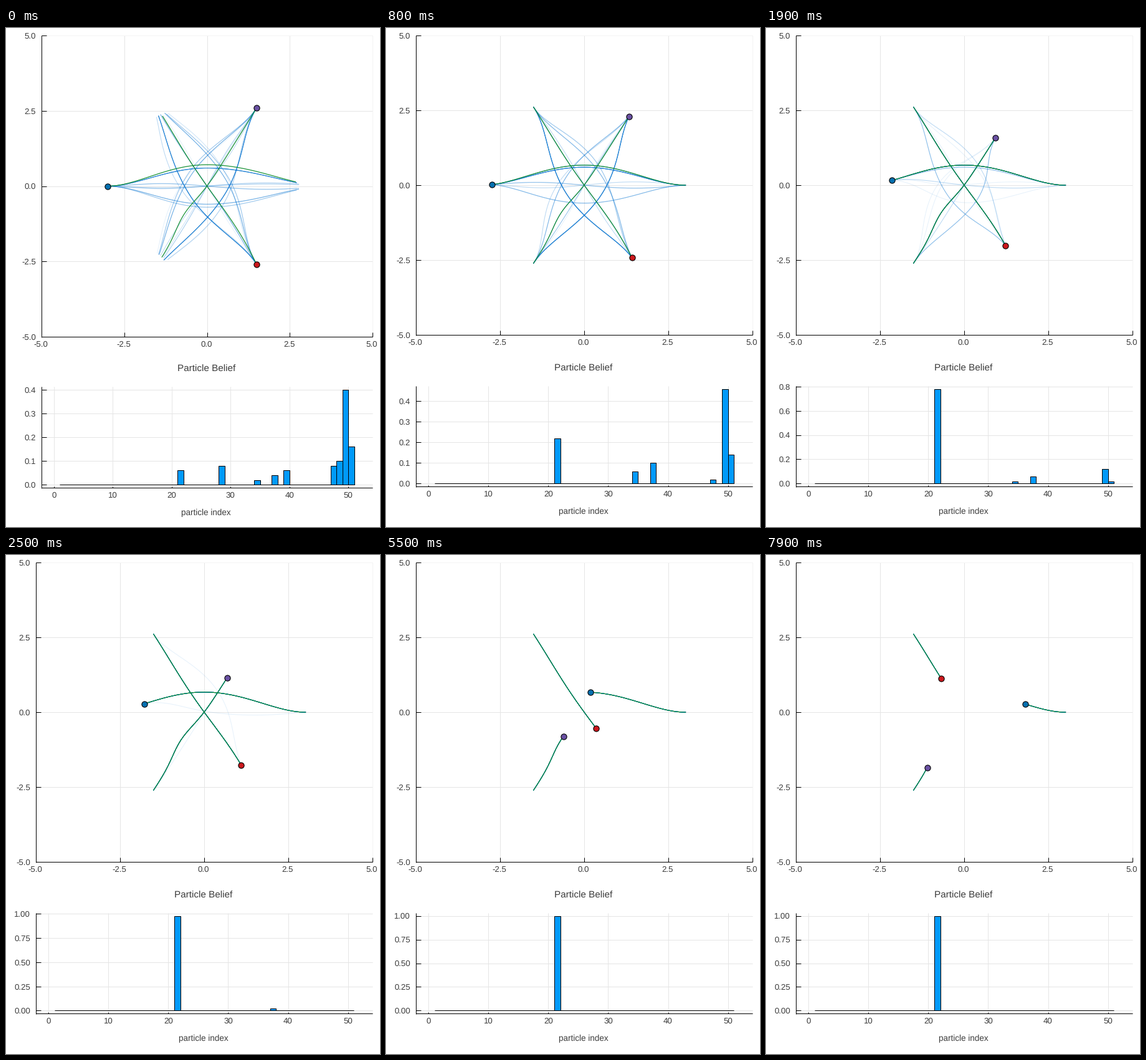
Recreate the animation shown at these times as a matplotlib script. Size 600x800 px, loop 8000 ms.

```python
import numpy as np
import matplotlib.pyplot as plt
from matplotlib.animation import FuncAnimation
from matplotlib.collections import LineCollection
from matplotlib.patches import Rectangle

W, H, DPI = 600, 800, 100
PX = 72 / DPI
FRAMES, STEP = 80, 100

INK, GRID, EDGE_GRID = "#3c3c3c", "#e5e5e5", "#f3f3f3"
BELIEF, TRUTH, BAR = "#0878d8", "#109022", "#009afa"
AGENT_COLORS = ["#0570b0", "#cb181d", "#6a51a3"]
HEADINGS = np.radians([0, 120, 240])

plt.rcParams["font.family"] = "Liberation Sans"
plt.rcParams["text.hinting"] = "none"
fig = plt.figure(figsize=(W / DPI, H / DPI), dpi=DPI, facecolor="white")
ax = fig.add_axes([0, 0, 1, 1])

# Key positions of each agent along its own axis, from -3 to 3
KEY_TIMES = np.array([0, 0.8, 2.5, 5.5, 7.9])
KEY_STEPS = np.array([
    [-3, -2.74, -1.787, 0.185, 1.806],
    [-3, -2.81, -2.085, -0.645, 1.304],
    [-3, -2.65, -1.335, 1.01, 2.148],
])

# Particle: copies at the start, growth, lifetime, turn per agent, turn size
TOTAL, TRUE_ID = 50, 21
PARTICLES = {
    28: (4, 0, 0.8, (0, 0, 1), 0.73),
    34: (1, 6.6, 2.6, (0, 0, -1), 0.7),
    37: (2, 4.4, 3.1, (0, -1, 0), 0.7),
    39: (3, 0, 0.8, (0, 1, 0), 0.73),
    47: (4, 0, 1.6, (0, 0, 0), 0),
    48: (5, 0, 0.8, (-1, -1, -1), 0.7),
    49: (20, 1.75, 2.6, (1, 1, 1), 0.6),
    50: (8, 1.12, 2.5, (-1, -1, -1), 0.6),
}


class Layout:
    """Pixel positions of both plots."""

    def __init__(self, left, bottom, belief_top, belief_bottom):
        self.left, self.right, self.top, self.bottom = left, 588, 12, bottom
        self.b_top, self.b_bottom = belief_top, belief_bottom
        self.b_full = (belief_bottom - belief_top) / 1.06
        self.b_zero = belief_bottom - 0.03 * self.b_full
        self.unit = (self.right - left) / 56.2
        self.mid = (left + self.right) / 2 - 1.3

    def x(self, v):
        return self.left + (v + 5) / 10 * (self.right - self.left)

    def y(self, v):
        return self.bottom - (v + 5) / 10 * (self.bottom - self.top)

    def index_x(self, v):
        return self.left + (v + 2.1) * self.unit


FIRST = Layout(57, 495, 575, 737)
REST = Layout(48, 492, 574, 735)


def progress(agent, t):
    """Cubic Hermite motion through the key positions."""
    ys = KEY_STEPS[agent]
    m = np.gradient(ys, KEY_TIMES, edge_order=2)
    i = min(np.searchsorted(KEY_TIMES, t, side="right"), len(ys) - 1) - 1
    h = KEY_TIMES[i + 1] - KEY_TIMES[i]
    u = (t - KEY_TIMES[i]) / h
    return ((1 + 2 * u) * (1 - u) ** 2 * ys[i] + u * (1 - u) ** 2 * h * m[i]
            + u * u * (3 - 2 * u) * ys[i + 1] + u * u * (u - 1) * h * m[i + 1])


def counts_at(t):
    counts = {pid: int(n * (1 + gain * t) * max(0, 1 - t / life) ** 2 + 0.5)
              for pid, (n, gain, life, *_) in PARTICLES.items()}
    counts[TRUE_ID] = TOTAL - sum(counts.values())
    return counts


def bell(s, far, skew=0):
    u = np.clip(np.where(s > 0, s / far, s / 3), -1, 1)
    u = u - skew * (1 - u * u)
    return np.clip(1 - u * u, 0, None) ** 2


def true_offset(agent, s, k):
    if agent == 0:
        return (0.67 + 0.04 * k) * bell(s, 3 + 0.6 * k)
    if agent == 1:
        return (0.05 - 0.016 * s) * np.sin(np.pi * s / 3)
    return 0.02 * np.cos(np.pi * s / 6) - 0.15 * np.exp(-((s - 1.15) / 0.85) ** 2)


def offset(pid, agent, s, k):
    if pid == TRUE_ID:
        return true_offset(agent, s, k)
    turns, size = PARTICLES[pid][3:]
    far = 3 + 0.6 * k
    if turns[agent]:
        skew = 0.12 if 0 in turns else 0
        return turns[agent] * size * bell(s, far, skew)
    return 0.11 * np.sin(1.2 * pid - 1.5 + 2 * agent) * np.sin(np.pi * s / far)


def to_stage(lay, agent, s, n):
    c, d = np.cos(HEADINGS[agent]), np.sin(HEADINGS[agent])
    return np.column_stack([lay.x(s * c - n * d), lay.y(s * d + n * c)])


def line(xs, ys, color="black", z=1):
    ax.plot(xs, ys, color=color, lw=PX, zorder=z, solid_capstyle="butt")


def text(x, y, s, size=13.3, ha="center"):
    ax.text(x, y, s, fontsize=size * PX, color=INK, ha=ha, va="baseline")


def x_tick(x, bottom, length, label, label_x, drop):
    line([x, x], [bottom - length, bottom], z=2)
    text(label_x, bottom + drop, label)


def y_tick(lay, y, label):
    line([lay.left, lay.left + 8], [y, y], z=2)
    text(lay.left - 9, y + 4.8, label, ha="right")


def spines(lay, top, bottom):
    line([lay.left] * 2, [top, bottom + 1], z=6)
    line([lay.left, lay.right], [bottom] * 2, z=6)


def draw_plane(lay):
    for v in np.arange(-5, 5.1, 2.5):
        x, y, label = lay.x(v), lay.y(v), f"{v:.1f}"
        shade = EDGE_GRID if v == 5 else GRID
        line([x, x], [lay.top, lay.bottom], shade)
        line([lay.left, lay.right], [y, y], shade)
        x_tick(x, lay.bottom, 7, label, x - 1, 16.3)
        y_tick(lay, y, label)
    spines(lay, lay.top, lay.bottom)


def draw_paths(lay, t, counts):
    k = max(0, 1 - t / 0.8)
    copies, truth = [], []
    for agent, color in enumerate(AGENT_COLORS):
        s0 = progress(agent, t)
        n0 = true_offset(agent, s0, k)
        for pid, count in counts.items():
            spread = 0.05 * k * np.sin(pid * 2.3 + agent)
            s = np.linspace(s0, min(3.02, 2.73 + spread + 0.4 * t), 60)
            n = offset(pid, agent, s, k)
            # Every path leaves from the agent, then joins its own lane
            ds = s - s0
            n = n + (n0 - n[0]) * (1 + 0.9 * ds) * np.exp(-(ds / 1.1) ** 2)
            pts = to_stage(lay, agent, s, n)
            copies += [pts] * count
            if pid == TRUE_ID:
                truth.append(pts)
        x, y = to_stage(lay, agent, s0, n0)[0]
        ax.plot(x, y, "o", ms=9.2 * PX, mfc=color, mec="black", mew=1.1 * PX,
                zorder=8, snap=False)
    ax.add_collection(LineCollection(copies, colors=BELIEF, alpha=0.1,
                                     linewidths=PX, zorder=3))
    ax.add_collection(LineCollection(truth, colors=TRUTH, alpha=0.95,
                                     linewidths=1.15 * PX, zorder=4))


def draw_belief(lay, counts):
    peak = max(counts.values()) / TOTAL
    scale = lay.b_full / peak
    step = 0.25 if peak > 0.94 else 0.2 if peak > 0.57 else 0.1
    digits = 2 if step == 0.25 else 1

    for v in range(0, TOTAL + 1, 10):
        x = lay.index_x(v)
        line([x, x], [lay.b_top, lay.b_bottom], GRID)
        x_tick(x, lay.b_bottom, 2, str(v), x, 15.5)
    for v in np.arange(0, peak * 1.03, step):
        y = lay.b_zero - v * scale
        line([lay.left, lay.right], [y, y], GRID)
        y_tick(lay, y, f"{v:.{digits}f}")
    spines(lay, lay.b_top, lay.b_bottom)

    line([lay.index_x(1), lay.index_x(TOTAL + 1)], [lay.b_zero] * 2, z=5)
    for pid, count in counts.items():
        if count:
            ax.add_patch(Rectangle((lay.index_x(pid), lay.b_zero), lay.unit,
                                   -count / TOTAL * scale, fc=BAR, ec="black",
                                   lw=PX, zorder=5))
    text(lay.mid, lay.b_top - 24, "Particle Belief", 15.2)
    text(lay.mid, lay.b_bottom + 44, "particle index", 13.5)


def draw(i):
    t = i * STEP / 1000
    lay = REST if i else FIRST
    counts = counts_at(t)
    ax.cla()
    ax.set_axis_off()
    ax.set_xlim(0, W)
    ax.set_ylim(H, 0)
    ax.set_autoscale_on(False)
    draw_plane(lay)
    draw_paths(lay, t, counts)
    draw_belief(lay, counts)
    return []


anim = FuncAnimation(fig, draw, frames=FRAMES, interval=STEP, repeat=True)
plt.show()
```
